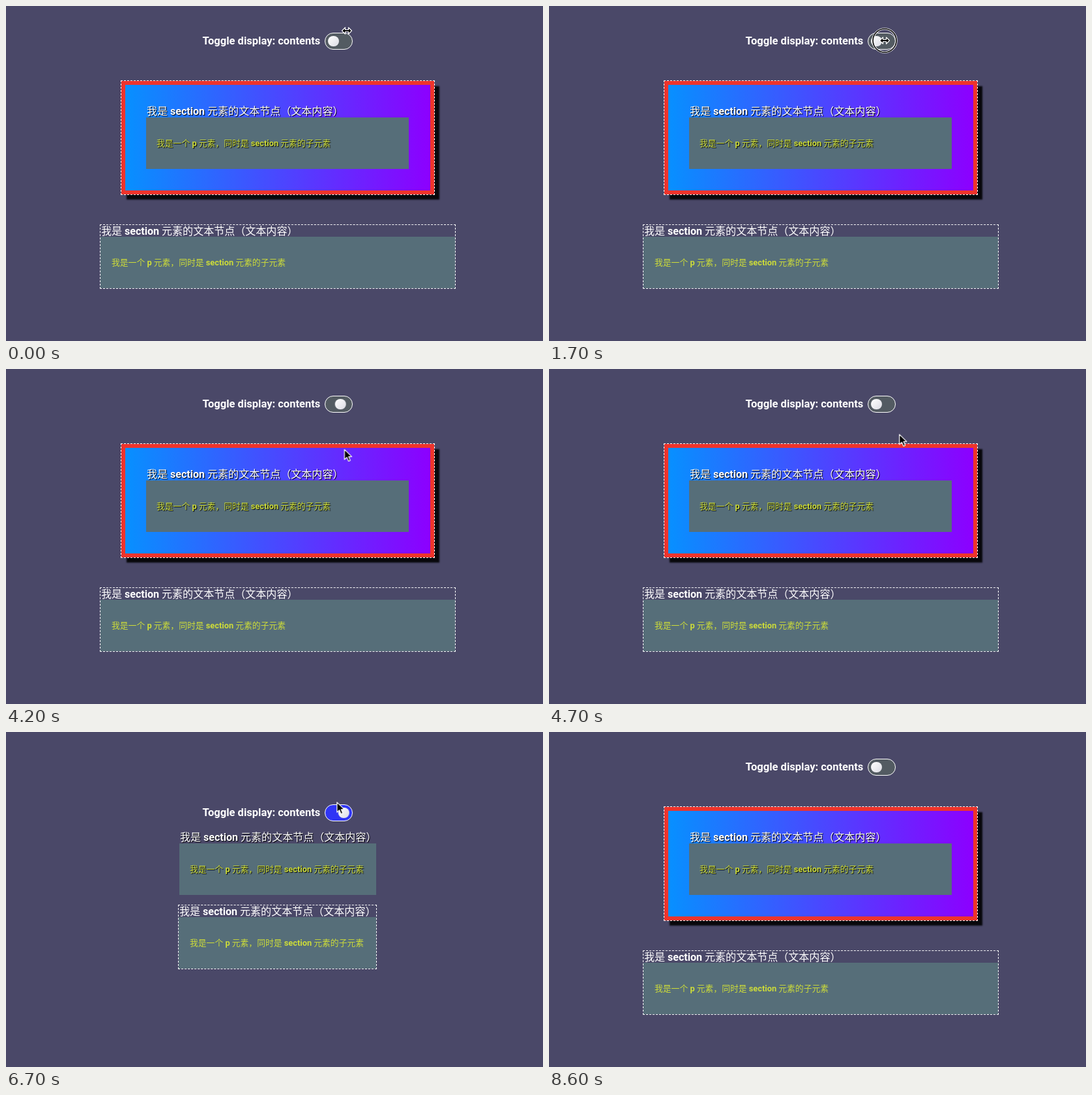
Animation of 824 by 514 pixels, one loop 8700 ms. Source, as an HTML page:

```html
<!DOCTYPE html>
<html lang="zh-CN">
<head>
<meta charset="utf-8">
<title>Toggle display: contents</title>
<style>
  html, body { margin: 0; width: 100%; height: 100%; overflow: hidden; background: #4a4868; }

  .stage {
    --head-y: 41px; --track: #535b62; --chrome: visible;
    --x1: 215px; --w1: 403px;
    --x2: 145px; --w2: 544px; --y2: 336px;
    position: relative; width: 824px; height: 514px; overflow: hidden;
    background: #4a4868; color: #fff;
    font: 500 16px/19px Roboto, "Noto Sans CJK SC", "Noto Sans CJK", sans-serif;
    white-space: nowrap;
    animation: layout 8.7s step-end infinite;
  }
  .stage * { position: absolute; box-sizing: border-box; }
  .stage b { position: static; font-weight: 600; }

  .head { left: 301.5px; top: var(--head-y); font-size: 16.5px; font-weight: 600; line-height: 25px; }
  .toggle {
    left: 489px; top: var(--head-y); width: 43px; height: 26px;
    border: 1.5px solid #fff; border-radius: 13px; background: var(--track);
  }
  .knob {
    left: 4.3px; top: 3.8px; width: 16.5px; height: 16.5px; border-radius: 50%;
    background: linear-gradient(135deg, #fff, #dcdce4);
    animation: knob 8.7s linear infinite;
  }

  .chrome {
    left: 177px; top: 115px; width: 480px; height: 174px;
    visibility: var(--chrome);
    border: 6.5px solid #ee342c;
    background: linear-gradient(90deg, #0790ff, #8c00ff) padding-box;
    outline: 1px dashed #fff;
    box-shadow: 8px 8px 2px #08080c;
  }
  .card p {
    left: 0; top: 18px; width: 100%; height: 79px; margin: 0;
    padding: 32px 16px; background: #566e79; color: #cddc39;
    font-size: 12.8px; line-height: 15px;
  }
  .card span { left: 1px; top: -1px; z-index: 1; font-size: 16.05px; }
  .first { left: var(--x1); top: 153px; width: var(--w1); height: 97px; text-shadow: 1px 1px 1px #000; }
  .second {
    left: var(--x2); top: var(--y2); width: var(--w2); height: 97px;
    outline: 1px dashed #fff;
  }
  .second span { top: 0; }
  .second p { padding-left: 17px; }

  .pointer { left: 0; top: 0; overflow: visible; animation: travel 8.7s linear infinite; }
  .pointer * { position: static; }
  .arrow { animation: arrow 8.7s step-end infinite; }
  .resize { animation: resize 8.7s step-end infinite; }
  .ring { animation: ring 8.7s step-end infinite; }

  @keyframes layout {
    20.6%, 63.1% {
      --head-y: 111px; --track: #3035f5; --chrome: hidden;
      --x1: 266px; --w1: 302px;
      --x2: 265px; --w2: 303px; --y2: 266px;
    }
    0%, 47%, 84.9%, 100% {
      --head-y: 41px; --track: #535b62; --chrome: visible;
      --x1: 215px; --w1: 403px;
      --x2: 145px; --w2: 544px; --y2: 336px;
    }
  }
  @keyframes knob {
    0%, 20.7%, 50.6%, 63.3%, 88.6%, 100% { transform: none; }
    24.1%, 47.2%, 66.7%, 85.2% { transform: translateX(15.8px); }
    20.7%, 47.2%, 63.3%, 85.2% { animation-timing-function: ease; }
  }
  @keyframes travel {
    0%, 3% { transform: translate(523px, 38px); }
    12%, 22% { transform: translate(515px, 53px); }
    28% { transform: translate(521px, 100px); }
    34.5%, 37% { transform: translate(522px, 138px); }
    42%, 47.5% { transform: translate(516px, 125px); }
    54% { transform: translate(537px, 99px); }
    60%, 64% { transform: translate(513px, 53px); }
    72% { transform: translate(514px, 88px); }
    80%, 87% { transform: translate(503px, 117px); }
    94%, 100% { transform: translate(510px, 150px); }
  }
  @keyframes arrow {
    0%, 40.1%, 58.5%, 78.5%, 94.2%, 100% { visibility: hidden; }
    20.6%, 47%, 63.1%, 84.9% { visibility: visible; }
  }
  @keyframes resize {
    0%, 40.1%, 58.5%, 78.5% { visibility: visible; }
    20.6%, 47%, 63.1%, 84.9%, 100% { visibility: hidden; }
  }
  @keyframes ring {
    0%, 20.6%, 47%, 63.1%, 84.9%, 100% { visibility: hidden; }
    18.3%, 44.7%, 60.8%, 82.6% { visibility: visible; }
  }
</style>
</head>
<body>
<div class="stage">
  <div class="head">Toggle display: contents</div>
  <div class="toggle"><div class="knob"></div></div>

  <div class="chrome"></div>
  <div class="card first">
    <span>我是 <b>section</b> 元素的文本节点（文本内容）</span>
    <p>我是一个 <b>p</b> 元素，同时是 <b>section</b> 元素的子元素</p>
  </div>
  <div class="card second">
    <span>我是 <b>section</b> 元素的文本节点（文本内容）</span>
    <p>我是一个 <b>p</b> 元素，同时是 <b>section</b> 元素的子元素</p>
  </div>

  <svg class="pointer" width="1" height="1" stroke-linejoin="round">
    <g class="ring" fill="none">
      <circle r="18" stroke="#fff" stroke-width="3.2"/>
      <circle r="18" stroke="#000" stroke-width="1.6"/>
    </g>
    <path class="arrow" d="M.8 1.6V17L4.4 13.6L7 19.6L9.7 18.4L7.2 12.6H12Z" fill="#000" stroke="#fff" stroke-width="1.2"/>
    <path class="resize" d="M-7.5 0L-2.5 -5V-1.5H2.5V-5L7.5 0L2.5 5V1.5H-2.5V5Z" fill="#000" stroke="#fff" stroke-width="1.2"/>
  </svg>
</div>
</body>
</html>
```
